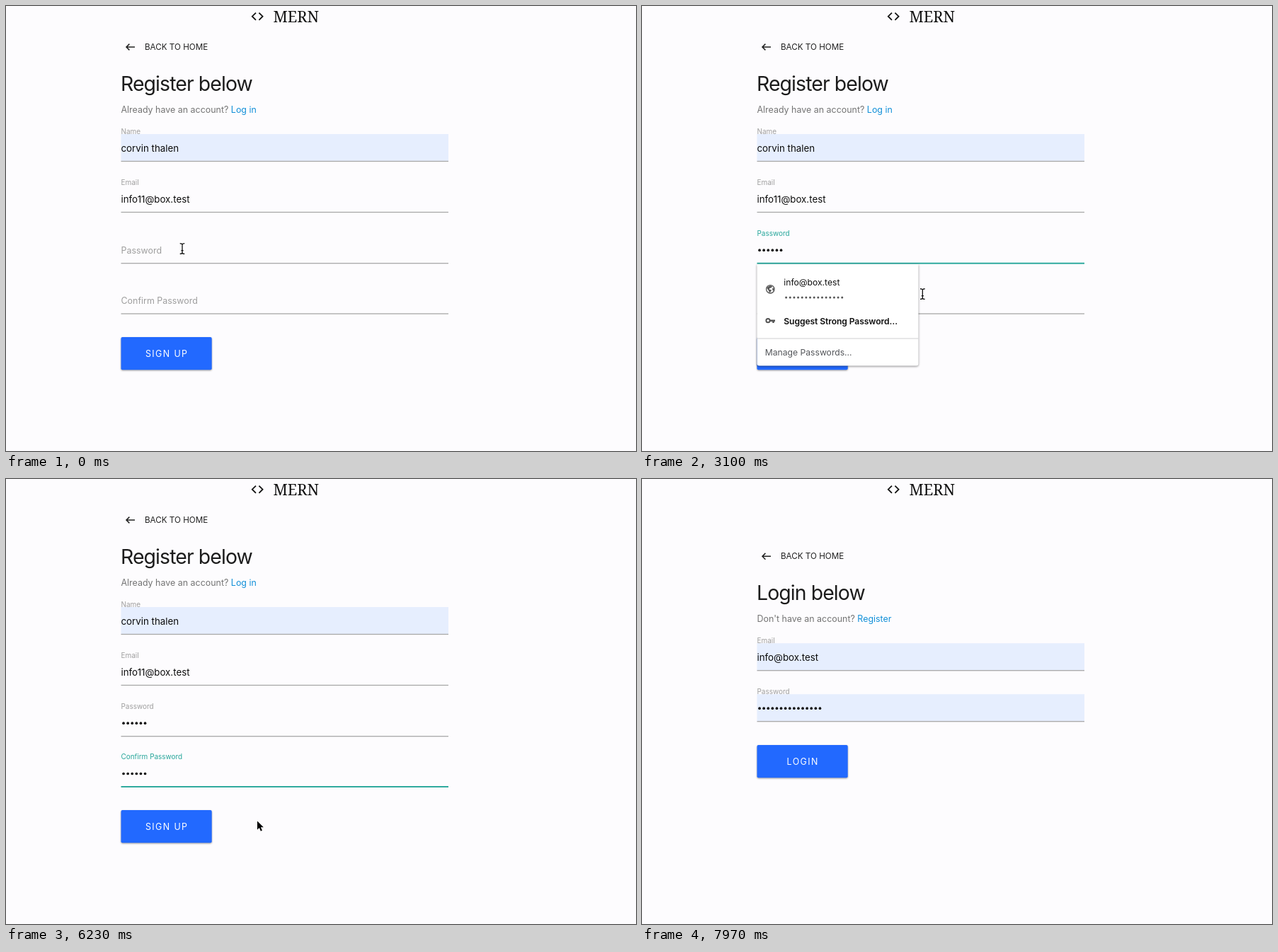
Animation of 890x629 px, one loop 8 s. Source, as an HTML page:

```html
<!DOCTYPE html>
<html lang="en">
<head>
<meta charset="utf-8">
<title>Register form</title>
<style>
html, body { margin: 0; width: 100%; height: 100%; overflow: hidden; background: #fdfcfe; }
svg { display: block; width: 890px; height: 629px; font-family: Inter, sans-serif; font-optical-sizing: none; }
.brand { font: 21.7px "Noto Serif", serif; }
.popup { filter: drop-shadow(0 1px 1.5px rgba(0,0,0,.45)); }
</style>
</head>
<body>
<svg id="stage" viewBox="0 0 890 629" xmlns="http://www.w3.org/2000/svg"></svg>
<script>
const LOOP = 8000;
const LEFT = 162.5, RIGHT = 625;
const TEAL = [38, 166, 154], GREY = [158, 158, 158], LINE = [168, 168, 168];
const USER = 'info@box.test';

const CLICK_PASS = 300, CLICK_CONF = 3320, PRESS = 6650, PAGE = 6900, AUTOFILL = 7400;
const PASS_KEYS = [900, 1130, 1400, 1630, 2000, 2300];
const CONF_KEYS = [4420, 4700, 5000, 5250, 5430, 5620];

// pointer stops: time, x, y
const PATH = [
  [0, 249, 343], [2730, 249, 343], [3250, 433, 423], [3570, 433, 423],
  [4250, 369, 424], [5700, 369, 424], [6030, 362, 479], [6230, 355, 483.5],
  [6560, 252, 485], [7200, 252, 485], [7700, 667, 330], [7940, 816, 292]
];
const HIDDEN = [[900, 2730], [4420, 5700], [7945, LOOP]];

const clamp = v => Math.max(0, Math.min(1, v));
const lerp = (a, b, p) => a + (b - a) * p;
const ramp = (t, start, ms) => clamp((t - start) / ms);
const easeOut = p => 1 - Math.pow(1 - p, 1.75);
const smooth = p => p * p * (3 - 2 * p);
const mix = (a, b, p) => `rgb(${a.map((v, i) => Math.round(lerp(v, b[i], p)))})`;
const count = (keys, t) => keys.filter(k => t >= k).length;

const text = (x, y, size, fill, str, more = '') =>
  `<text x="${x}" y="${y}" font-size="${size}" fill="${fill}" ${more}>${str}</text>`;
const rect = (x, y, w, h, fill, more = '') =>
  `<rect x="${x}" y="${y}" width="${w}" height="${h}" fill="${fill}" ${more}/>`;
const path = (d, more) => `<path d="${d}" ${more}/>`;
const stroke = (color, w) => `fill="none" stroke="${color}" stroke-width="${w}"`;
const at = (x, y, body) => `<g transform="translate(${x} ${y})">${body}</g>`;

function dots(x, y, n, pitch, r, fill) {
  let out = '';
  for (let i = 0; i < n; i++)
    out += `<circle cx="${x + pitch * (i + .5)}" cy="${y}" r="${r}" fill="${fill}"/>`;
  return out;
}

// y is the underline; lift raises the label, focus tints it
function field(y, label, { lift = 0, focus = 0, value = '', mask = 0, filled = false, caret = false }) {
  const thick = lerp(1.3, 1.9, focus);
  let out = filled ? rect(LEFT, y - 38.5, RIGHT - LEFT, 38.5, '#e6eefe') : '';
  out += rect(LEFT, y - thick / 2, RIGHT - LEFT, thick, mix(LINE, TEAL, focus));
  out += text(LEFT, y - 14 - 25 * lift, 12.45 * (1 - .2 * lift), mix(GREY, TEAL, focus), label);
  if (value) out += text(LEFT, y - 14, 13.3, '#0c0c0c', value);
  out += dots(163, y - 18.5, mask, 6.1, 1.85, '#111');
  if (caret) out += rect(162.4 + mask * 6.15, y - 27.5, 1.2, 16, '#111');
  return out;
}

function button(y, label, hover) {
  const shadow = `drop-shadow(0 ${1.2 + hover}px ${1.3 + hover * 1.5}px rgba(0,0,0,.4))`;
  return rect(LEFT, y, 128.2, 46.3, '#2269ff', `rx="2" style="filter:${shadow}"`) +
    text(227.2, y + 28, 12.45, '#fff', label, 'text-anchor="middle" letter-spacing="1.4"');
}

function heading(dy, title, ask, link) {
  return at(0, dy,
    path('M182 58H170M174.4 53.6L170 58l4.4 4.4', stroke('#222', 1.5)) +
    text(196, 62, 11.65, '#222', 'BACK TO HOME') +
    text(162, 119.5, 28.4, '#1c1c1c', title, 'letter-spacing="-.9"') +
    text(LEFT, 151, 12.45, '#747474', `${ask} <tspan fill="#1290d8">${link}</tspan>`));
}

const globe = `<circle r="5.7" ${stroke('#555', 1.3)}/>` +
  path('M-5 -2L-1 -5L3 -4.5L1.5 -2L-1 -1.5L-1.5 .5L1.5 1L1 3L-1 5L-2.5 2Z', 'fill="#555"') +
  path('M3 -2L5.3 -1L5 2.5L3 1.5Z', 'fill="#555"');
const keyIcon = `<circle cx="-3" r="2.6" ${stroke('#555', 2)}/>` +
  path('M0 -1.2H7V1.2H5.8V3.2H3.2V1.2H0Z', 'fill="#555"');

function popup(y, width, strong, alpha) {
  const rule = y + (strong ? 105 : 71), bottom = rule + 38.5;
  return `<g class="popup" opacity="${alpha}">` +
    path(`M${LEFT} ${y}h${width}V${bottom - 3}q0 3 -3 3h${6 - width}q-3 0 -3 -3Z`, 'fill="#fff"') +
    '</g>' + `<g opacity="${alpha}">` +
    text(200.3, y + 30, 12.15, '#111', USER) +
    dots(200.8, y + 47, 15, 5.65, 1.5, '#555') +
    at(181.3, y + 35.3, globe) +
    (strong ? at(181, y + 79.7, keyIcon) +
      text(200.3, y + 85, 12.15, '#111', 'Suggest Strong Password…', 'font-weight="600" letter-spacing="-.1"') : '') +
    rect(LEFT, rule - .5, width, 1, '#cfcfd2') +
    text(173.8, rule + 24.3, 12.15, '#55575b', 'Manage Passwords…') + '</g>';
}

const arrow = path('M0 0V12.2L2.8 9.6L4.9 14.2L6.9 13.3L4.9 8.8H8.8Z',
  'fill="#000" stroke="#fff" stroke-width="1" paint-order="stroke"');
const beam = path('M-3.3 -7.3Q0 -7.3 0 -5.4Q0 -7.3 3.3 -7.3M0 -5.8V5.8M-3.3 7.3Q0 7.3 0 5.4Q0 7.3 3.3 7.3M-1.6 2.6H1.6',
  stroke('#111', 1.3));
const hand = path('M-1.2 0Q0 -1.4 1.2 0V5L6.2 6Q7.4 6.5 7.2 8L6.2 13H-1L-4.6 8Q-4.4 6.4 -2.8 7L-1.2 8.6Z',
  'fill="#fff" stroke="#000" stroke-width="1"');

function pointer(t) {
  let i = 0;
  while (i < PATH.length - 2 && t >= PATH[i + 1][0]) i++;
  const [t0, x0, y0] = PATH[i], [t1, x1, y1] = PATH[i + 1];
  const p = smooth(ramp(t, t0, t1 - t0));
  return { x: lerp(x0, x1, p), y: lerp(y0, y1, p) };
}

function cursor(t, lines, buttonY, covered) {
  if (HIDDEN.some(([a, b]) => t >= a && t < b)) return '';
  const { x, y } = pointer(t);
  const inField = x > LEFT && x < RIGHT && lines.some(l => y > l - 38 && y < l);
  const onButton = x > LEFT && x < 291 && y > buttonY && y < buttonY + 46;
  const shape = covered(x, y) ? arrow : inField ? beam : onButton ? hand : arrow;
  return at(x, y, shape);
}

function register(t) {
  const lines = [219.5, 291.5, 363.7, 435];
  const focusP = smooth(ramp(t, CLICK_PASS, 300)) * (1 - smooth(ramp(t, CLICK_CONF, 300)));
  const focusC = smooth(ramp(t, CLICK_CONF, 200)) * (1 - smooth(ramp(t, PRESS, 300)));
  const marks = [CLICK_PASS, ...PASS_KEYS, CLICK_CONF, ...CONF_KEYS].filter(m => t >= m);
  const lit = marks.length > 0 && t < PRESS && (t - marks[marks.length - 1]) % 1000 < 500;
  const first = t >= 420 && t < CLICK_CONF;
  const second = t >= 3400 ? 1 - ramp(t, 4500, 200) : 0;
  const hover = smooth(ramp(t, 6430, 250));

  return heading(0, 'Register below', 'Already have an account?', 'Log in') +
    field(lines[0], 'Name', { lift: 1, value: 'corvin thalen', filled: true }) +
    field(lines[1], 'Email', { lift: 1, value: 'info11@box.test' }) +
    field(lines[2], 'Password', {
      lift: easeOut(ramp(t, CLICK_PASS, 200)), focus: focusP,
      mask: count(PASS_KEYS, t), caret: lit && t < CLICK_CONF
    }) +
    field(lines[3], 'Confirm Password', {
      lift: easeOut(ramp(t, CLICK_CONF, 200)), focus: focusC,
      mask: count(CONF_KEYS, t), caret: lit && t >= CLICK_CONF
    }) +
    button(468, 'SIGN UP', hover) +
    (first ? popup(365, 228, true, 1) : '') +
    (second > 0 ? popup(437, 182.3, false, second) : '') +
    cursor(t, lines, 468, (x, y) => first && x < 391 && y > 365 && y < 509);
}

function login(t) {
  const lines = [270.7, 342.7];
  const filled = t >= AUTOFILL;
  const lift = easeOut(ramp(t, AUTOFILL, 200));
  return heading(51.3, 'Login below', "Don't have an account?", 'Register') +
    field(lines[0], 'Email', { lift, filled, value: filled ? USER : '' }) +
    field(lines[1], 'Password', { lift, filled, mask: filled ? 15 : 0 }) +
    button(376, 'LOGIN', 0) +
    cursor(t, lines, 376, () => false);
}

const header = path('M353 9.6L347.8 14.7L353 19.8M357.4 9.6L362.6 14.7L357.4 19.8', stroke('#111', 1.8)) +
  '<text class="brand" x="377.5" y="23" fill="#111">MERN</text>';

const stage = document.getElementById('stage');
let last = '';

function draw(t) {
  const markup = rect(0, 0, 890, 629, '#fdfcfe') + header + (t < PAGE ? register(t) : login(t));
  if (markup !== last) stage.innerHTML = last = markup;
}

const begin = performance.now();
function tick() {
  draw((performance.now() - begin) % LOOP);
  requestAnimationFrame(tick);
}
tick();
</script>
</body>
</html>
```
